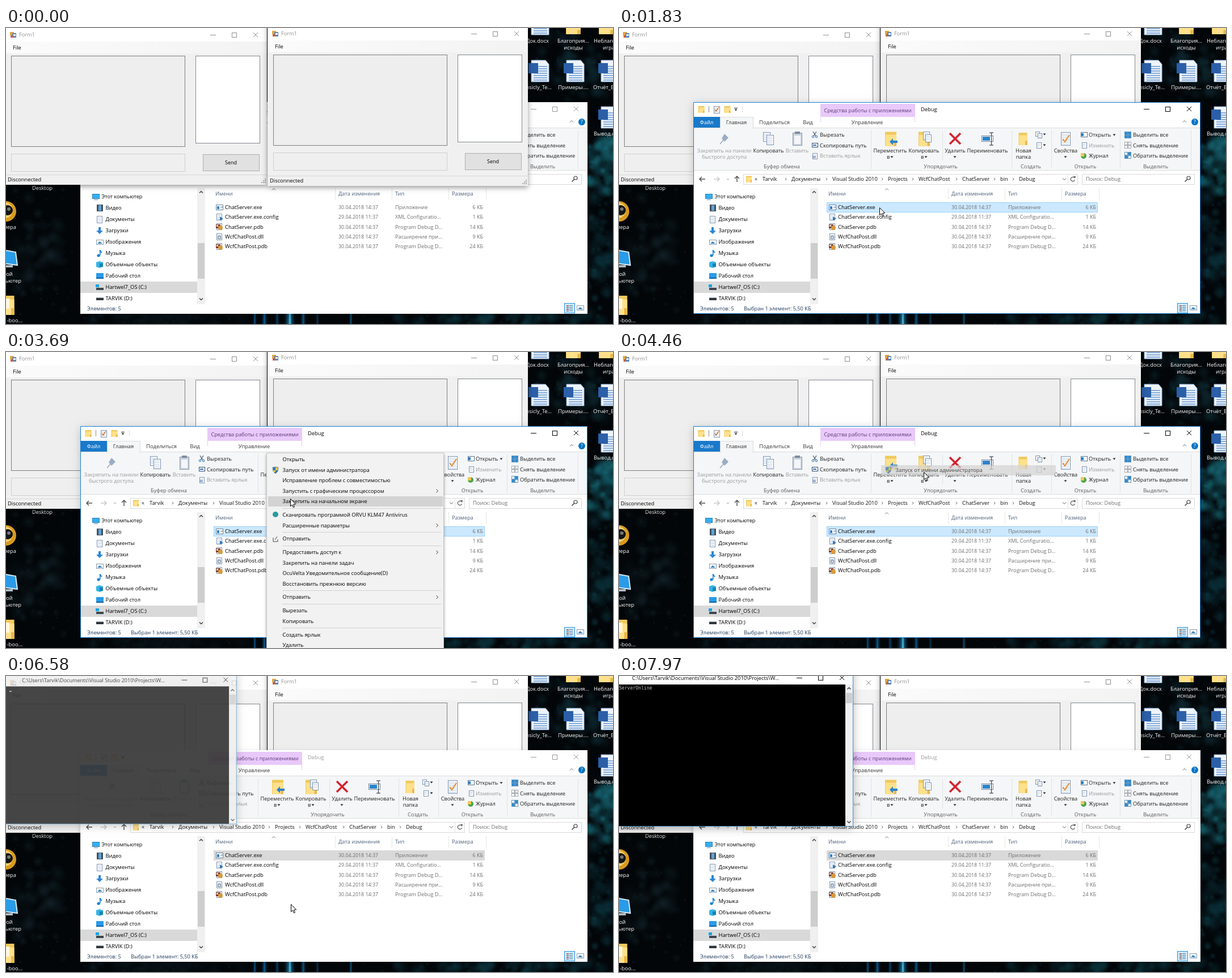
An HTML page with a canvas that plays this animation: 1070 px wide and 523 px high, repeating every 8 s.

```html
<!DOCTYPE html>
<html lang="ru">
<head>
<meta charset="utf-8">
<style>
html, body { margin: 0; width: 100%; height: 100%; overflow: hidden; background: #000; }
canvas { display: block; }
</style>
</head>
<body>
<canvas id="stage" width="1070" height="523"></canvas>
<script>
const LOOP = 8000;
const FONT = '"Open Sans", "Noto Sans", sans-serif';
let ctx = document.getElementById('stage').getContext('2d');

// ---- drawing helpers ----
function rect(x, y, w, h, fill) { ctx.fillStyle = fill; ctx.fillRect(x, y, w, h); }

function box(x, y, w, h, fill, stroke) {
  if (fill) rect(x, y, w, h, fill);
  ctx.lineWidth = 1;
  ctx.strokeStyle = stroke;
  ctx.strokeRect(x + .5, y + .5, w - 1, h - 1);
}

function text(s, x, yMid, color = '#000', size = 9.35, align = 'left', family = FONT) {
  ctx.font = `${size}px ${family}`;
  ctx.textAlign = align;
  ctx.fillStyle = color;
  ctx.fillText(s, x, Math.round(yMid + 3.2));
}

function poly(points, fill, stroke, width = 1, closed = true) {
  ctx.beginPath();
  points.forEach(([x, y]) => ctx.lineTo(x, y));
  if (closed) ctx.closePath();
  if (fill) { ctx.fillStyle = fill; ctx.fill(); }
  if (stroke) { ctx.strokeStyle = stroke; ctx.lineWidth = width; ctx.stroke(); }
}
const path = (color, width, ...points) => poly(points, null, color, width, false);

function disc(x, y, r, fill) {
  ctx.beginPath(); ctx.arc(x, y, r, 0, 7); ctx.fillStyle = fill; ctx.fill();
}
function ring(x, y, r, color, width = 1, from = 0, to = 6.3) {
  ctx.beginPath(); ctx.arc(x, y, r, from, to);
  ctx.strokeStyle = color; ctx.lineWidth = width; ctx.stroke();
}

function shadowed(x, y, w, h, fill, blur, alpha) {
  ctx.save();
  ctx.shadowColor = `rgba(0,0,0,${alpha})`;
  ctx.shadowBlur = blur;
  ctx.shadowOffsetY = 3;
  rect(x, y, w, h, fill);
  ctx.restore();
}

// Paints onto a separate canvas of the stage's size.
function layer(paint) {
  const canvas = document.createElement('canvas');
  canvas.width = 1070; canvas.height = 523;
  const outer = ctx;
  ctx = canvas.getContext('2d');
  paint();
  ctx = outer;
  return canvas;
}

// (dx, dy) is the way it points
function chevron(x, y, dx, dy, color = '#555', s = 2.5, width = 1) {
  path(color, width, [x - dx * s / 2 - dy * s, y - dy * s / 2 - dx * s], [x + dx * s / 2, y + dy * s / 2],
    [x - dx * s / 2 + dy * s, y - dy * s / 2 + dx * s]);
}
const drop = (x, y, color = '#222') => poly([[x - 2.5, y - 1.5], [x + 2.5, y - 1.5], [x, y + 1.5]], color);

function folder(x, y, w, h) {
  rect(x - w / 2, y - h / 2, w, h, '#f0c95c');
  rect(x - w / 2 + 1, y - h / 2 + h * .2, w - 1, h * .8, '#ffe08a');
  rect(x + w * .28, y + h * .15, w * .22, h * .35, '#e8b84a');
}
function page(x, y, w, h, line = '#7c93b0') {
  box(Math.round(x - w / 2), Math.round(y - h / 2), w, h, '#fff', line);
  for (let i = 3; i < h - 2; i += 3) rect(x - w / 2 + 2, Math.round(y - h / 2) + i, w - 4, 1, '#b9cbe2');
}

function windowButtons(x, y, color) {
  rect(x, y, 10, 1, color);
  box(x + 38, y - 4, 9, 9, null, color);
  path(color, 1, [x + 76, y - 4], [x + 84, y + 4]);
  path(color, 1, [x + 84, y - 4], [x + 76, y + 4]);
}

// ---- desktop ----
function wordDoc(x, y) {
  poly([[x - 14, y - 20], [x + 11, y - 20], [x + 17, y - 13], [x + 17, y + 18], [x - 14, y + 18]], '#eef4fb', '#8fb0d8');
  for (let i = -10; i < 15; i += 4) rect(x - 10, y + i, 24, 2, '#86acd9');
  rect(x - 19, y - 15, 17, 18, '#2b5fa8');
}
function label(s, x, y, align = 'center') {
  ctx.save();
  ctx.shadowColor = '#000'; ctx.shadowBlur = 2; ctx.shadowOffsetX = ctx.shadowOffsetY = 1;
  text(s, x, y, '#fff', 9.35, align);
  ctx.restore();
}

function paintDesktop() {
  rect(0, 0, 1070, 523, '#020609');
  let seed = 7;
  const rnd = () => (seed = seed * 16807 % 2147483647) / 2147483647;
  const glow = (x, y, r, rgb, alpha) => {
    const g = ctx.createRadialGradient(x, y, 0, x, y, r);
    g.addColorStop(0, `rgba(${rgb},${alpha})`); g.addColorStop(1, `rgba(${rgb},0)`);
    rect(x - r, y - r, 2 * r, 2 * r, g);
  };
  // Clouds of small puffs: centre, half extents, colour
  for (const [x, y, rx, ry, rgb] of [[995, 65, 75, 65, '16,48,56'], [1055, 245, 35, 65, '24,112,126'],
    [1050, 400, 30, 110, '12,58,68'], [840, 514, 230, 12, '12,56,66'], [60, 395, 75, 120, '18,34,40'], [280, 514, 150, 12, '10,26,32']]) {
    for (let i = 0; i < 90; i++) {
      glow(x + (rnd() + rnd() - 1) * rx, y + (rnd() + rnd() - 1) * ry, 3 + rnd() * 15, i % 3 ? rgb : '2,6,9', .2 + rnd() * .4);
    }
  }
  for (let i = 0; i < 2000; i++) {
    rect(rnd() * 1070, rnd() * 523, 1 + rnd() * 2, 1 + rnd() * 3, `rgba(${i % 3 ? '40,90,100' : '0,0,0'},${rnd() * .22})`);
  }
  for (const [x, w, c] of [[434, 9, '#0a5284'], [449, 13, '#0b5f96'], [473, 10, '#07456e'], [488, 24, '#1b93c9'],
    [496, 9, '#52c6ee'], [518, 12, '#0a5c8c'], [545, 8, '#063a59'], [604, 8, '#0b5a80']]) {
    const g = ctx.createLinearGradient(x, 0, x + w, 0);
    g.addColorStop(0, 'rgba(0,0,0,0)'); g.addColorStop(.5, c); g.addColorStop(1, 'rgba(0,0,0,0)');
    rect(x, 500, w, 23, g);
  }

  wordDoc(940, -6); folder(1000, 0, 26, 22); folder(1058, 0, 26, 22);
  wordDoc(940, 77); wordDoc(1002, 77); wordDoc(1063, 77); wordDoc(1063, 159);
  label('Док.docx', 957, 23, 'right');
  label('Благоприя...', 1000, 23); label('исходы', 1000, 35);
  label('Неблагоп...', 1036, 23, 'left'); label('игра', 1052, 35, 'left');
  label('nsicly_Te...', 962, 105, 'right');
  label('Примеры....', 1000, 105);
  label('Отчёт_Б...', 1035, 105, 'left');
  label('Вывод.docx', 1036, 187, 'left');

  label('Desktop', 64, 283);
  disc(0, 324, 18, '#d89a1c'); disc(-2, 322, 14, '#f4cf73'); disc(3, 322, 9, '#141414'); disc(5, 320, 3, '#777');
  label('мера', 18, 352, 'right');
  poly([[-5, 392], [17, 396], [20, 419], [-5, 416]], '#2a9be8', '#d7eaf6', 2);
  rect(0, 419, 12, 4, '#aebbc4');
  label('ой', 6, 435); label('ьютер', 27, 447, 'right');
  folder(2, 490, 25, 34); rect(-2, 478, 8, 18, '#fff7dd');
  label('-boo...', 29, 517, 'right');
}

// ---- chat client form ----
function form(x, y, left, right, bottom) {
  const statusY = bottom - 9, width = right - left;
  shadowed(left, -20, width, bottom + 20, '#f0f0f0', 9, .4);
  rect(left, 0, width, y + 24, '#fff');
  const strip = ctx.createLinearGradient(left, 0, right, 0);
  strip.addColorStop(0, '#fbfbfb'); strip.addColorStop(1, '#f3f3f3');
  rect(left, y + 24, width, 21, strip);

  rect(x + 7, y + 7, 7, 6, '#e3a63a'); rect(x + 11, y + 9, 7, 8, '#5f86b8'); rect(x + 8, y + 13, 4, 4, '#c95f3a');
  rect(x + 13, y + 11, 4, 3, '#fff');
  text('Form1', x + 23, y + 12, '#8f8f8f', 9.2);
  windowButtons(right - 100, y + 12, '#8f8f8f');
  text('File', x + 12, y + 35);

  box(x + 9, y + 49, 307, 161, '#eeeeee', '#7d7d7d');
  box(x + 334, y + 49, 114, 155, '#fff', '#828790');
  box(x + 9, y + 222, 307, 32, '#efefef', '#cfcfcf');
  box(x + 347, y + 223, 100, 30, '#e1e1e1', '#adadad');
  text('Send', x + 396.5, y + 237.5, '#000', 9, 'center');
  rect(left, statusY - 9, width, 1, '#d8d8d8');
  text('Disconnected', x + 3, statusY);
  for (let i = 0; i < 3; i++) for (let j = 0; j <= i; j++) rect(right - 4 - j * 3, statusY - 2 + i * 3, 2, 2, '#a8a8a8');
}

// ---- file explorer ----
const FILES = [
  ['ChatServer.exe', '30.04.2018 14:37', 'Приложение', '6 КБ'],
  ['ChatServer.exe.config', '29.04.2018 11:37', 'XML Configuratio...', '1 КБ'],
  ['ChatServer.pdb', '30.04.2018 14:37', 'Program Debug D...', '14 КБ'],
  ['WcfChatPost.dll', '30.04.2018 14:37', 'Расширение при...', '9 КБ'],
  ['WcfChatPost.pdb', '30.04.2018 14:37', 'Program Debug D...', '24 КБ']
];
const ROW_TOP = 308, ROW_H = 17.4;
const PLACES = ['Этот компьютер', 'Видео', 'Документы', 'Загрузки', 'Изображения', 'Музыка', 'Объемные объекты',
  'Рабочий стол', 'Hartwel7_OS (C:)', 'TARVIK (D:)'];
const CRUMBS = [['Tarvik', 253], ['Документы', 304], ['Visual Studio 2010', 376], ['Projects', 474],
  ['WcfChatPost', 528], ['ChatServer', 605], ['bin', 672], ['Debug', 705]];

function screenIcon(x, y) { box(x - 6, y - 5, 13, 9, '#35b0f0', '#2a7fb8'); rect(x - 3, y + 5, 7, 1, '#7a8a95'); }
function picture(x, y) { box(x - 6, y - 4, 13, 9, '#fff', '#8a99a8'); poly([[x - 4, y + 3], [x, y - 1], [x + 5, y + 3]], '#2f86c8'); }

const PLACE_ICONS = [
  screenIcon,
  (x, y) => { rect(x - 5, y - 6, 11, 12, '#44505a'); rect(x - 2, y - 5, 5, 10, '#5aa4d8'); },
  (x, y) => page(x, y, 10, 13),
  (x, y) => poly([[x - 2, y - 6], [x + 2, y - 6], [x + 2, y], [x + 6, y], [x, y + 6], [x - 6, y], [x - 2, y]], '#2b87d6'),
  picture,
  (x, y) => { disc(x - 2, y + 4, 2.6, '#1d83d4'); rect(x, y - 6, 1.6, 10, '#1d83d4'); path('#1d83d4', 2, [x, y - 5], [x + 4, y - 1]); },
  (x, y) => { poly([[x - 6, y - 4], [x, y - 6], [x + 6, y - 4], [x + 6, y + 4], [x, y + 6], [x - 6, y + 4]], '#35b4e4'); rect(x, y - 2, 6, 6, '#1583b8'); },
  (x, y) => { rect(x - 6, y - 5, 13, 10, '#2a9be8'); rect(x - 6, y + 3, 13, 2, '#0d5f9c'); },
  (x, y) => { rect(x - 7, y - 5, 6, 5, '#19a1e6'); rect(x - 6, y + 1, 13, 4, '#3c4650'); },
  (x, y) => { rect(x - 6, y - 1, 13, 4, '#2f373d'); rect(x - 6, y - 2, 13, 1, '#aab3b9'); }
];

function fileIcon(i, y) {
  if (i === 0) { box(370, y - 5, 13, 10, '#fff', '#6a8299'); rect(372, y - 2, 4, 5, '#2683d2'); rect(378, y - 1, 4, 1, '#777'); return; }
  page(376, y, 10, 12);
  if (i === 1) poly([[377, y - 1], [383, y + 3], [377, y + 6]], '#2d76b8');
  if (i === 3) ring(376, y + 1, 2.5, '#8494a4', 1.5);
  if (i === 2 || i === 4) { rect(370, y - 4, 8, 7, '#7b3e2f'); disc(378, y + 2, 4, '#d99a3a'); rect(371, y - 3, 3, 3, '#e7d9c8'); }
}

function ribbon() {
  rect(132, 176, 892, 76, '#f5f6f7');
  rect(132, 176, 892, 1, '#dadbdc'); rect(132, 251, 892, 1, '#dadbdc');
  box(178, 157, 59, 21, '#f5f6f7', '#dadbdc'); rect(179, 176, 57, 3, '#f5f6f7');
  rect(131, 157, 47, 19, '#1979ca');
  text('Файл', 154.5, 166.5, '#fff', 9.35, 'center');
  [['Главная', 207], ['Поделиться', 274], ['Вид', 333], ['Управление', 437.5]].forEach(([s, x]) => text(s, x, 166.5, '#333', 9.35, 'center'));
  chevron(997, 165, 0, -1, '#666', 3);
  disc(1015, 166, 6, '#0a74c4'); text('?', 1015, 166, '#fff', 9, 'center');

  for (const x of [444, 692, 762, 883, 1008]) rect(x, 180, 1, 69, '#e1e2e3');
  rect(570, 182, 1, 52, '#e1e2e3');
  [['Буфер обмена', 287], ['Упорядочить', 567], ['Создать', 726], ['Открыть', 822], ['Выделить', 946]]
    .forEach(([s, x]) => text(s, x, 245, '#5a5a5a', 9.2, 'center'));

  const big = (x, color, ...lines) => lines.forEach((s, i) => text(s, x, 217 + i * 11, color, 9.2, 'center'));
  const ink = '#1e1e1e', dim = '#9a9a9a';
  path('#9aa8b8', 1.5, [178, 205], [184, 198]);
  poly([[181, 195], [186, 187], [193, 194], [186, 201]], '#9badc4');
  big(185.5, dim, 'Закрепить на панели', 'быстрого доступа');
  page(260, 192, 13, 17); page(266, 198, 13, 18); big(263.5, ink, 'Копировать');
  box(306, 185, 17, 23, '#c9d1dc', '#8b99ad'); rect(310, 183, 9, 4, '#7e8ca0'); rect(309, 190, 11, 15, '#f4f6f9'); big(314, dim, 'Вставить');
  path('#4a5a70', 1.2, [342, 183], [347, 191]); path('#4a5a70', 1.2, [348, 183], [343, 191]);
  ring(342, 192, 1.8, '#2a72b8'); ring(348, 192, 1.8, '#2a72b8');
  box(340, 203, 11, 8, '#fff', '#2a4a6a'); rect(342, 206, 6, 2, '#2a6cae');
  page(345, 226, 9, 11); rect(342, 226, 5, 4, '#9ab0cc');
  text('Вырезать', 354, 189, ink); text('Скопировать путь', 354, 207.5, ink); text('Вставить ярлык', 354, 226, dim);

  folder(479, 196, 20, 25); poly([[477, 201], [483, 195], [483, 199], [491, 199], [491, 203], [483, 203], [483, 207]], '#2d82cc');
  big(478, ink, 'Переместить'); text('в', 472, 228, ink); drop(481, 228);
  folder(538, 196, 20, 25); page(542, 190, 12, 15); page(545, 195, 11, 14);
  big(537.5, ink, 'Копировать'); text('в', 532, 228, ink); drop(541, 228);
  path('#d3232e', 3.5, [583, 186], [602, 205]); path('#d3232e', 3.5, [602, 186], [583, 205]);
  big(592.5, ink, 'Удалить'); drop(592, 228);
  box(639, 190, 21, 11, '#fff', '#6f8296'); rect(641, 192, 13, 7, '#2d82cc');
  path('#44505c', 1.3, [653, 185], [660, 185]); path('#44505c', 1.3, [656.5, 185], [656.5, 207]); path('#44505c', 1.3, [653, 207], [660, 207]);
  big(649.5, ink, 'Переименовать');
  folder(712, 196, 15, 22); big(713, ink, 'Новая', 'папка');
  page(738, 187, 8, 9); page(742, 190, 8, 9); drop(750, 188); page(740, 207, 9, 11); drop(750, 207);
  page(787, 196, 17, 24); path('#e08a2c', 2, [782, 196], [786, 201], [794, 189]);
  big(787.5, ink, 'Свойства'); drop(787, 228);
  box(814, 184, 12, 9, '#fff', '#5c7188'); rect(815, 186, 4, 5, '#2683d2');
  page(820, 207, 9, 11); disc(819, 226, 5, '#4aa64a'); rect(814, 221, 6, 6, '#f0c95c');
  text('Открыть', 828, 189, ink); drop(873, 189); text('Изменить', 828, 207.5, dim); text('Журнал', 828, 226, ink);
  const quads = [['#2d8ad0', '#2d8ad0', '#2d8ad0', '#2d8ad0'], ['#fff', '#fff', '#fff', '#fff'], ['#fff', '#2d8ad0', '#2d8ad0', '#fff']];
  quads.forEach((set, r) => set.forEach((c, i) =>
    box(891 + i % 2 * 6, 183 + r * 18 + (i >> 1) * 6, 6, 6, c, r === 1 ? '#a3a9b0' : '#5d96c4')));
  text('Выделить все', 906, 189, ink); text('Снять выделение', 906, 207.5, ink); text('Обратить выделение', 906, 226, ink);
}

function arrow(x, y, dx, dy, color) {
  path(color, 1.4, [x - dx * 5, y - dy * 5], [x + dx * 5, y + dy * 5]);
  chevron(x + dx * 3, y + dy * 3, dx, dy, color, 4, 1.4);
}

function addressBar() {
  arrow(147, 267, -1, 0, '#444'); arrow(172, 267, 1, 0, '#c4c4c4'); chevron(192, 267, 0, 1, '#999', 2); arrow(208, 267, 0, -1, '#444');
  box(219, 258, 590, 19, '#fff', '#d9d9d9'); rect(791, 258, 1, 19, '#e2e2e2');
  folder(229, 267, 10, 11);
  text('«', 239, 267, '#333', 10);
  CRUMBS.forEach(([s, x], i) => {
    text(s, x, 267, '#111');
    if (i) chevron(x - 10, 267, 1, 0, '#666', 2.2);
  });
  chevron(785, 267, 0, 1, '#555', 3);
  ring(800, 267, 3.7, '#555', 1.2, .3, 5.5); poly([[801, 262], [805, 262], [804, 266]], '#555');
  box(816, 258, 199, 19, '#fff', '#d9d9d9');
  text('Поиск: Debug', 823, 267, '#6d6d6d');
  ring(1004, 265, 3, '#444', 1.2); path('#444', 1.6, [1001.5, 267.5], [997.5, 271.5]);
}

function explorer({ active, selected, grayRow, hoverRow }) {
  const ink = active ? '#000' : '#999';
  shadowed(131, 131, 894, 374, '#fff', active ? 14 : 8, .2);
  folder(145, 144, 11, 12); rect(158, 138, 1, 11, '#8a8a8a');
  page(172, 144, 11, 13); path('#d0722c', 1.4, [169, 144], [171, 147], [176, 140]);
  folder(191, 144, 11, 12); rect(203, 141, 6, 1, '#222'); drop(206, 145);
  rect(217, 138, 1, 11, '#ddd');
  rect(355, 134, 167, 23, '#e8c9fa');
  rect(355, 157, 1, 9, '#e8c9fa'); rect(521, 157, 1, 9, '#e8c9fa');
  text('Средства работы с приложениями', 438.5, 146, '#5b3a78', 9.2, 'center');
  text('Debug', 532, 143.5, ink);
  windowButtons(925, 143, ink);
  ribbon();
  addressBar();

  rect(131, 448, 206, 20, '#d9d9d9');
  PLACES.forEach((s, i) => {
    const y = 298 + i * 20, x = i ? 165 : 158;
    PLACE_ICONS[i](x, y);
    text(s, x + 10.5, y, '#000', i ? 9.35 : 9.1);
  });
  rect(337, 283, 14, 205, '#f0f0f0');
  rect(338, 380, 12, 63, '#cdcdcd');
  chevron(344, 290, 0, -1, '#444', 3, 1.5); chevron(344, 479, 0, 1, '#444', 3, 1.5);

  [['Имени', 369], ['Дата изменения', 586], ['Тип', 686], ['Размера', 786]].forEach(([s, x]) => text(s, x, 292.5, '#4c607a', 9.2));
  for (const x of [580, 680, 780, 846]) rect(x, 283, 1, 20, '#e5e5e5');
  chevron(472, 285, 0, -1, '#777', 3);
  FILES.forEach(([name, date, type, size], i) => {
    const top = Math.round(ROW_TOP + i * ROW_H), y = ROW_TOP + 8.6 + i * ROW_H;
    if (selected && i === 0) grayRow ? rect(366, top, 478, 18, '#d9d9d9') : box(366, top, 478, 18, '#cce8ff', '#99d1ff');
    else if (i === hoverRow) rect(366, top, 478, 18, '#e5f3ff');
    fileIcon(i, Math.round(y));
    text(name, 386, y);
    text(date, 586, y, '#6d6d6d', 8.85);
    text(type, 686, y, '#6d6d6d', 9.2);
    text(size, 841, y, '#6d6d6d', 9, 'right');
  });

  text('Элементов: 5', 143, 495.5, '#1e395b');
  if (selected) text('Выбран 1 элемент: 5,50 КБ', 220, 495.5, '#1e395b', 9.2);
  box(984, 486, 19, 18, '#cce8ff', '#2b94dd');
  for (let i = 0; i < 4; i++) { rect(988, 490 + i * 3, 4, 2, i % 2 ? '#7c96ac' : '#b96a4a'); rect(993, 490 + i * 3, 6, 1, '#5d7a94'); }
  picture(1012, 494);
  if (active) box(131, 131, 894, 374, null, '#1883d7');
}

// ---- context menu: [text, starts a new section, has submenu] ----
let menuY = 171.5;
const MENU = [
  ['Открыть'], ['Запуск от имени администратора'], ['Исправление проблем с совместимостью'],
  ['Запустить с графическим процессором', 0, 1], ['Закрепить на начальном экране'],
  ['Сканировать программой ORVU KLM47 Antivirus', 1], ['Расширенные параметры', 0, 1], ['Отправить', 1],
  ['Предоставить доступ к', 1, 1], ['Закрепить на панели задач'], ['OcuVelta Уведомительное сообщение(D)'],
  ['Восстановить прежнюю версию'], ['Отправить', 1, 1], ['Вырезать', 1], ['Копировать'], ['Создать ярлык', 1], ['Удалить']
].map(([name, section, sub]) => ({ name, section, sub, y: menuY += section ? 23.8 : 18.5 }));

function shield(x, y) {
  poly([[x - 5, y - 5], [x, y - 6], [x + 5, y - 5], [x + 4, y + 2], [x, y + 6], [x - 4, y + 2]], '#2f78bd', '#7b8894');
  rect(x, y - 5, 4, 5, '#f3cc3c'); rect(x - 4, y, 4, 3, '#f3cc3c');
}

function menuItem(item, hot) {
  const { name, y, sub } = item;
  if (hot) rect(462, Math.round(y - 9), 308, 18, '#d3d3d3');
  if (item === MENU[1]) shield(475, 209);
  text(name, 487.5, y);
  if (sub) chevron(760, y, 1, 0, '#333', 3);
}

const menuPanel = layer(() => {
  shadowed(459, 178, 313, 360, '#f2f2f2', 5, .35);
  box(459, 178, 313, 360, null, '#c6c6c6');
  for (const item of MENU) {
    if (item.section) rect(487, Math.round(item.y - 12), 280, 1, '#d0d0d0');
    menuItem(item);
  }
  disc(475, 287, 5, '#2b9aa0');
  path('#444', 1, [471, 328], [471, 335], [479, 335], [479, 331]); path('#444', 1, [474, 332], [478, 326]);
});

function faded(alpha, paint) {
  ctx.save();
  ctx.globalAlpha = alpha;
  paint();
  ctx.restore();
}

// ---- console window ----
function consoleWindow(t) {
  const p = Math.min(1, (t - 6440) / 200), scale = .9 + .1 * p;
  ctx.save();
  ctx.globalAlpha = p;
  ctx.translate(200, 128); ctx.scale(scale, scale); ctx.translate(-200, -128);
  shadowed(-12, -12, 425, 278, '#fff', 14, .3);
  text('C:\\Users\\Tarvik\\Documents\\Visual Studio 2010\\Projects\\W...', 23, 3.5);
  windowButtons(313, 3, '#000');
  rect(-12, 15, 411, 250, '#000');
  rect(399, 15, 13, 250, '#f0f0f0'); rect(400, 30, 11, 18, '#cdcdcd');
  chevron(405.5, 22, 0, -1, '#444', 3, 1.5); chevron(405.5, 258, 0, 1, '#444', 3, 1.5);
  rect(412, -12, 1, 278, '#4a90c4'); rect(-12, 265, 425, 1, '#4a90c4');
  const online = t >= 7270;
  if (online) text('ServerOnline', 0, 20.5, '#c0c0c0', 8.1, 'left', '"DejaVu Sans Mono", monospace');
  if (Math.floor(t / 530) % 2 === 0) rect(0, online ? 33 : 23, 4, 2, '#ddd');
  ctx.restore();
}

// ---- pointer: [start, end, steps, x, y], each from where the last one ended ----
const MOVES = [
  [0, 0, 1, 945, 540], [510, 1200, 10, 459, 317], [2990, 2990, 1, 457, 317], [3460, 4080, 9, 537, 212],
  [4930, 4930, 1, 501, 401], [6500, 6730, 4, 502, 403], [6810, 7190, 6, 498, 385], [7270, 7970, 10, 420, -20]
];

function pointerAt(t) {
  let x = 0, y = 0;
  for (const [start, end, steps, toX, toY] of MOVES) {
    if (t < start) break;
    const step = end > start ? Math.floor((t - start) / (end - start) * (steps - 1) + 1e-6) + 1 : steps;
    const p = Math.min(1, step / steps), eased = 1 - (1 - p) ** 2;
    x += (toX - x) * eased;
    y += (toY - y) * eased;
  }
  return [x, y];
}

function pointer(x, y, busy) {
  if (busy) {
    ring(458.5, 318.5, 7.5, '#2f8fd8', 4.5);
    ring(458.5, 318.5, 7.5, '#a9dcf8', 3, 3.6, 5.6);
    return;
  }
  const shape = [[0, 0], [0, 13.2], [3, 10.4], [5, 15.2], [7, 14.3], [5.1, 9.7], [9.2, 9.4]];
  poly(shape.map(([a, b]) => [Math.round(x) + a + .5, Math.round(y) + b + .5]), '#fff', '#000');
}

// ---- timeline ----
const steps = (t, list) => list.reduce((value, [at, next]) => t >= at ? next : value, 0);
const backdrop = layer(paintDesktop);

function draw(t) {
  const [cx, cy] = pointerAt(t);
  const front = t >= 1660;
  const overList = cx >= 366 && cx < 844 && cy >= ROW_TOP && (t < 1660 || t >= 6810);
  const view = {
    active: front && t < 6500,
    selected: front,
    grayRow: t >= 4930,
    hoverRow: overList ? Math.floor((cy - ROW_TOP) / ROW_H) : -1
  };
  const forms = () => { form(0, 0, 0, 460, 277); form(462, -2, 461, 920, 279); };

  ctx.drawImage(backdrop, 0, 0);
  if (front) { forms(); explorer(view); } else { explorer(view); forms(); }

  const opacity = steps(t, [[2990, .14], [3080, .6], [3150, 1], [4460, 0]]);
  if (opacity) faded(opacity, () => {
    ctx.drawImage(menuPanel, 0, 0);
    const hot = MENU.find(item => cx > 460 && Math.abs(cy - item.y) < 9.25);
    if (hot) menuItem(hot, true);
  });
  const fading = steps(t, [[4460, .7], [4540, .45], [4610, .2], [4690, 0]]);
  if (fading) faded(fading, () => menuItem(MENU[1], true));
  if (t >= 6500) consoleWindow(t);
  pointer(cx, cy, t >= 2130 && t < 2990);
}

const begin = performance.now();
function tick() {
  draw((performance.now() - begin) % LOOP);
  requestAnimationFrame(tick);
}
tick();
</script>
</body>
</html>
```
